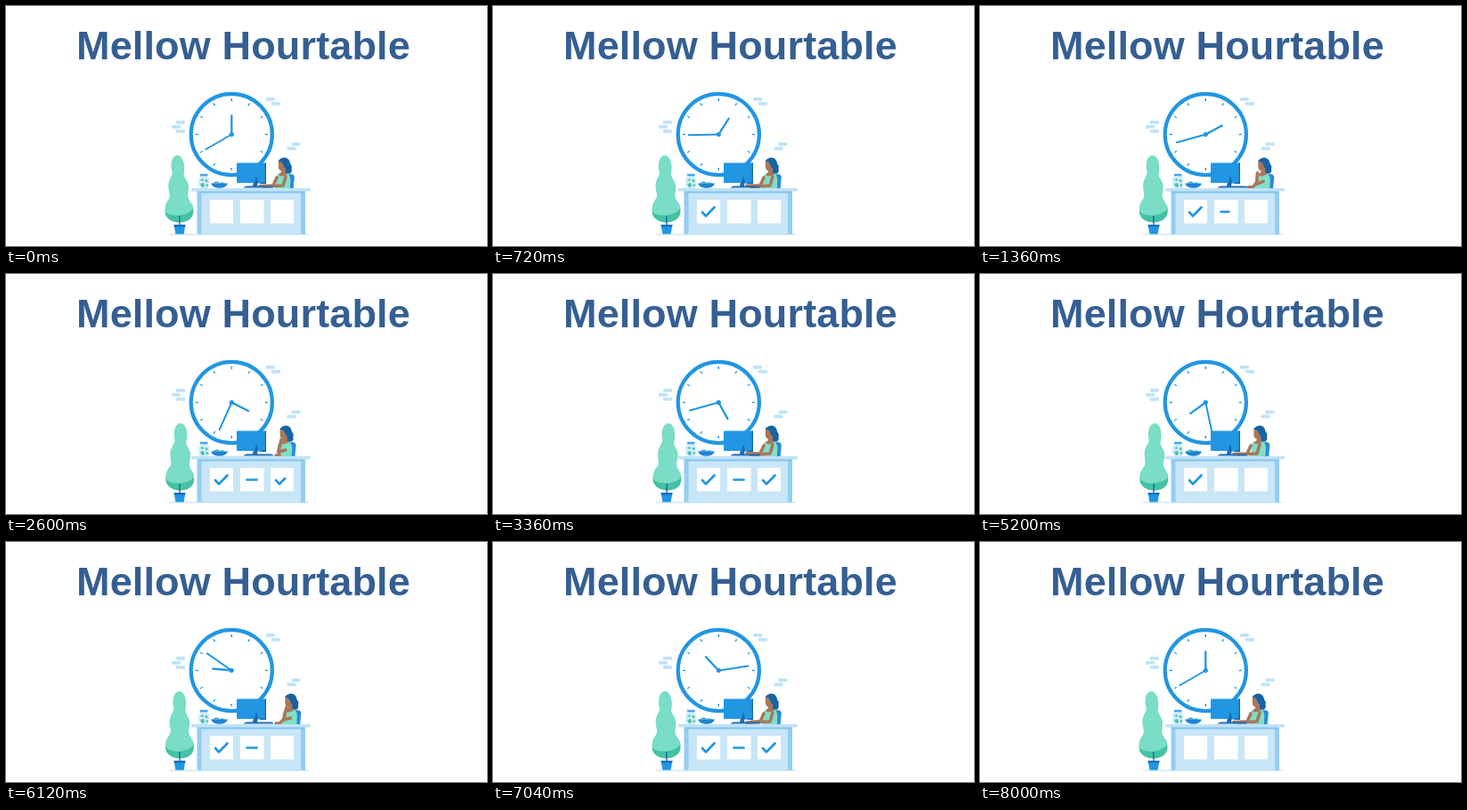
An HTML page that plays this animation: 540 px wide and 270 px high, repeating every 8.04 s.

```html
<!DOCTYPE html>
<html lang="en">
<head>
<meta charset="utf-8">
<title>Mellow Hourtable</title>
<style>
html, body { margin: 0; width: 100%; height: 100%; overflow: hidden; background: #fff; }
svg { display: block; }
text { font: bold 45px "Liberation Sans", Arial, sans-serif; letter-spacing: .15px; fill: #355f92; }
.line { fill: none; stroke: #2196e3; stroke-linecap: round; stroke-linejoin: round; }
.skin { fill: none; stroke: #a9775a; stroke-width: 3.6; stroke-linecap: round; stroke-linejoin: round; }
</style>
</head>
<body>
<svg width="540" height="270" viewBox="0 0 540 270">
  <text x="79" y="60">Mellow Hourtable</text>

  <g fill="#bfe3f7" id="bricks"></g>

  <g class="line">
    <circle cx="253.3" cy="144.5" r="45.6" stroke-width="4.2"/>
    <g id="ticks" stroke-width="1.4" stroke-linecap="butt"></g>
    <path id="hour" d="M253.3 144.5V123.5" stroke-width="2.3"/>
    <path id="minute" d="M253.3 144.5V111" stroke-width="2"/>
    <circle cx="253.3" cy="144.5" r="2.2" fill="#2196e3" stroke-width="1"/>
  </g>

  <!-- plant -->
  <g id="plant">
    <path d="M179 231C179 224 184 223 184.500 218C212 218 211 225 211 231C211 239 204 243.500 195 243.500S179 238 179 231Z" fill="#43c2a4"/>
    <path d="M194.800 168C190 168 187.500 174 187.600 181C187.700 186 189.500 187 188 190C185 195 183 200 184 206C184.500 211 186 213 183.500 217C180 221 178.500 226 179.500 231C184 237 203 238 211 228C210 221 205.500 219 205.300 214C205.200 210 207 207 206.300 202C205.500 196 201 193 201.500 189C202 186 202.700 184 202.300 180C202 174 199.500 168 194.800 168Z" fill="#7addc6"/>
    <path d="M195 246V236" stroke="#1c64a8" stroke-width="1.4"/>
  </g>
  <path d="M188.500 246H201.500L199.500 257H190.500Z" fill="#2196e3"/>
  <path d="M188.500 246H201.500L201 248.500H189Z" fill="#1a6fb8"/>

  <!-- person and chair -->
  <g id="sitter">
    <path d="M315 206V193Q316 189 320 189Q324 189.500 323.800 193L322.500 206Z" fill="#2a8bd5"/>
    <path d="M307 173C310 169 317 169.500 318.500 175C319 179 322 179 320.500 183C322 188 318 190 313 188L309 180Z" fill="#1763a6"/>
    <path d="M309 182H314V188L318 190L312 195L305 190L309 187Z" fill="#a9775a"/>
    <path d="M306 174Q311 173.500 312.500 177V181Q311 185.500 308 185.200Q305.500 184 305.800 179Z" fill="#a9775a"/>
    <path d="M305.500 175C307 171 313 171 315 176L313 181C311 179 311 176 308 175Z" fill="#1763a6"/>
    <path d="M305 189Q308 193 313 190.500L317 189Q320.500 194 319 200V206H301.500Q304 198 303 193Z" fill="#7fe0c8"/>
  </g>
  <path id="farArm" class="skin"/>
  <path id="nearArm" class="skin"/>

  <!-- desk -->
  <path d="M215 208H335V257H215Z" fill="#c8e6f7"/>
  <path d="M214.500 208H219.500V257H214.500ZM331 208H336V257H331Z" fill="#93cdf2"/>
  <path d="M215 208H335V210.500H215Z" fill="#83c4ee"/>
  <rect x="208" y="205" width="134" height="3.600" rx="1" fill="#c0e2f7"/>
  <path d="M183 257H340" stroke="#b5def5" stroke-width="1.2"/>
  <path d="M229 218h26v26.500h-26zM263 218h26.500v26.500h-26.500zM297 218h26v26.500h-26z" fill="#fff"/>
  <g class="line" stroke-width="2.7">
    <path class="mark" pathLength="1" d="M235 232L239 236.300L248.500 226.500"/>
    <path class="mark" pathLength="1" d="M270.500 231.500H281.500"/>
    <path class="mark" pathLength="1" d="M303 232L307 236.300L316.500 226.500"/>
  </g>

  <!-- things on the desk -->
  <rect x="216" y="192" width="12.500" height="13" rx="3.500" fill="#d3eef7"/>
  <path d="M218 188.800h8.500v2.700h-8.500z" fill="#47a8e8"/>
  <path d="M218 196l3-2 1 3zM223 195l4 1-2 3zM218 200l4-1 1 4-3 1zM224 201l3-1-1 4z" fill="#45bfa8"/>
  <path d="M230 199.500H249Q247 204.800 239.500 204.800T230 199.500Z" fill="#1f83d2"/>
  <path d="M232 199.500Q236 196 240 199Q244 197 246 200Z" fill="#3aa7c9"/>
  <path d="M267 203.700L270 202.500H277L279 192H284L282 202.500H298Q300 202.700 300 204.500H267Z" fill="#1c6cb4"/>
  <rect x="259" y="176.500" width="33" height="22.500" rx="1" fill="#2196e3"/>
  <path d="M290.700 176.500H292V200H282L290.700 198Z" fill="#1669b0"/>
  <path d="M279 199L281 191L283 199Z" fill="#1669b0"/>
</svg>
<script>
const FRAME = 40, LOOP = 8040, TURN = 8000, SHIFT = 4000;
const $ = id => document.getElementById(id);
const marks = document.querySelectorAll('.mark');
const markStarts = [0, 1200, 2450];

$('bricks').innerHTML = [[191, 129], [186, 134], [191, 139], [292, 103], [298, 108], [320.500, 153.500], [315.500, 158.500]]
  .map(([x, y]) => `<rect x="${x}" y="${y}" width="10" height="3.8" rx=".8"/>`).join('');
$('ticks').innerHTML = Array.from({length: 12}, (_, i) =>
  `<path d="M253.3 104v3" transform="rotate(${i * 30} 253.3 144.5)"/>`).join('');

const clamp = v => Math.min(1, Math.max(0, v));
const ease = (t, a, b) => {
  const p = clamp((t - a) / (b - a));
  return p * p * (3 - 2 * p);
};
const mix = (a, b, p) => a.map((v, i) => v + (b[i] - v) * p);
const spin = (id, deg, x, y) => $(id).setAttribute('transform', `rotate(${deg} ${x} ${y})`);
const limb = (id, p) => $(id).setAttribute('d', `M${p[0]} ${p[1]}L${p[2]} ${p[3]}L${p[4]} ${p[5]}`);

function draw(now) {
  const time = Math.floor(now % LOOP / FRAME) * FRAME % TURN;
  const phase = time % SHIFT;
  const turn = time / TURN;

  spin('hour', 360 * turn, 253.3, 144.5);
  spin('minute', 240 + 4320 * turn, 253.3, 144.5);
  spin('plant', -1.9 * Math.cos(2 * Math.PI * turn), 195, 246);

  marks.forEach((mark, i) => {
    const p = clamp((phase - markStarts[i]) / 200);
    mark.setAttribute('stroke-dasharray', `${p} 2`);
    mark.style.visibility = p ? 'visible' : 'hidden';
  });

  // lean back, think with a hand on the chin, return to typing
  const lean = 7.5 * (ease(phase, 1100, 1440) - ease(phase, 2340, 2720));
  const think = ease(phase, 1200, 1400) - ease(phase, 2600, 2900);
  const tap = (1 - think) * .7 * Math.sin(phase / SHIFT * 40 * Math.PI);
  $('sitter').setAttribute('transform', `translate(${lean} 0)`);
  limb('farArm', mix([304, 193, 300, 202, 285, 202.5 + tap], [305 + lean, 199, 307, 204, 303, 204], think));
  limb('nearArm', mix([314, 192, 311, 202, 290, 203 - tap], [312 + lean, 198, 304 + lean, 200, 307.5 + lean, 186], think));
  requestAnimationFrame(draw);
}
requestAnimationFrame(draw);
</script>
</body>
</html>
```
